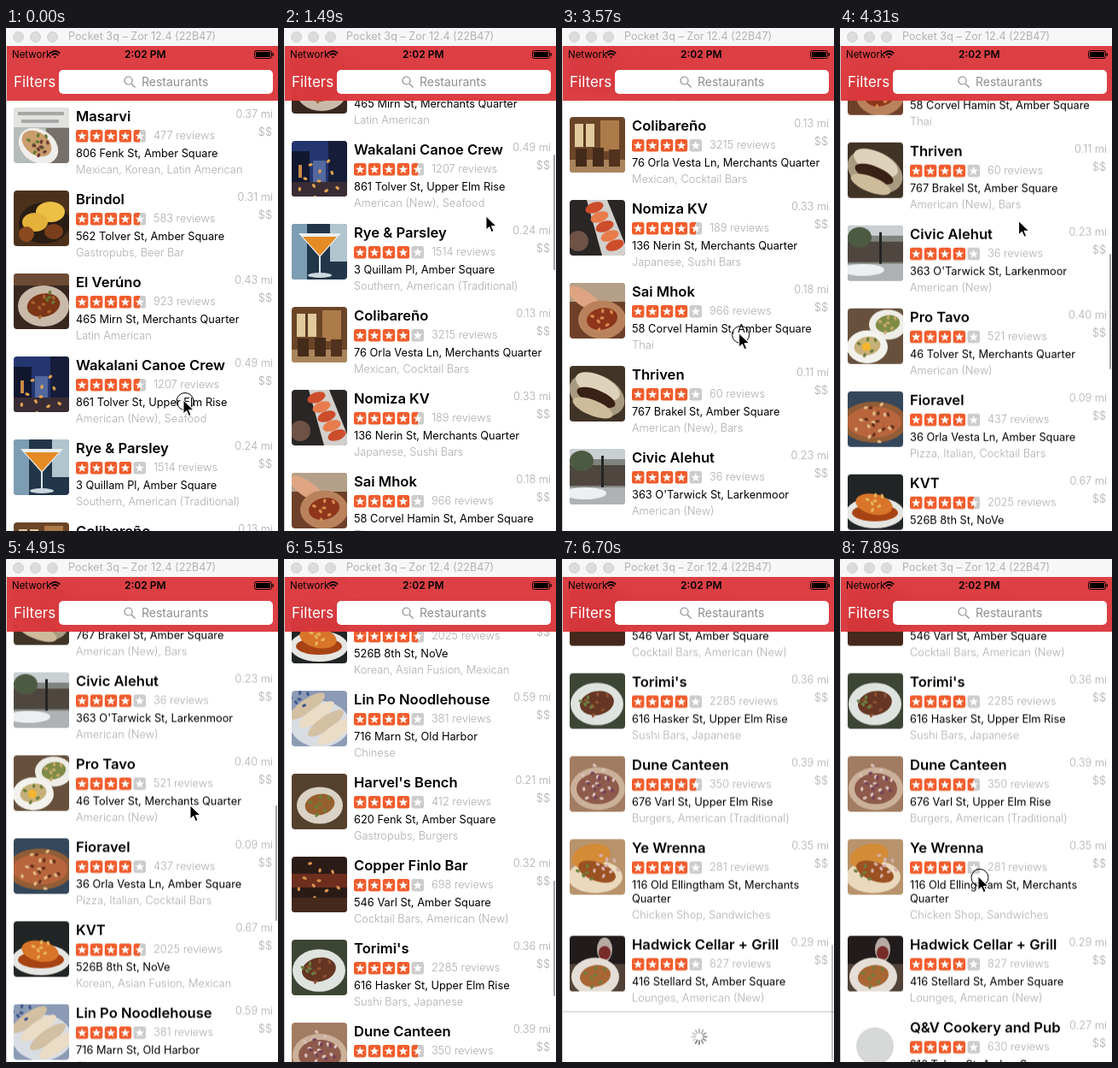
Write an HTML page that moves like this. It is 319x588 px and loops after 8 s.

```html
<!DOCTYPE html>
<html lang="en">
<head>
<meta charset="utf-8">
<title>Restaurant list</title>
<style>
html, body { margin: 0; width: 100%; height: 100%; overflow: hidden; background: #fff; }
body { position: relative; font: 12.8px/16px Inter, "Open Sans", sans-serif; color: #000; }
body *, .row * { white-space: pre; }
#list, .row, .row > *, .bar, .bar > *, .window, .window > *, #thumbBar, #cursor, #spinner, #edge { position: absolute; }
#list { left: 0; top: 84px; width: 319px; will-change: transform; }
.row { left: 0; width: 319px; height: 97px; background: #fff; }
.row::after { content: ""; position: absolute; left: 1px; right: 0; bottom: -1px; height: 1px; background: #d6d5d9; }
.photo { left: 9px; top: 9px; width: 65px; height: 65px; border-radius: 4px; }
.name { left: 82px; top: 9px; font-size: 16.6px; font-weight: 600; line-height: 20px; }
.stars { left: 82px; top: 35px; }
.reviews { left: 173px; top: 34px; }
.address { left: 82px; top: 55px; line-height: 15.5px; }
.kinds { left: 82px; bottom: 7px; }
.distance { right: 6px; top: 9px; }
.price { right: 7px; top: 30px; }
.reviews, .kinds, .distance, .price { color: #adadad; font-weight: 300; }
.bar { left: 1px; top: 21px; width: 318px; height: 64px; background: #db373cf4; backdrop-filter: blur(14px); }
.network { left: 6px; top: 2px; font-size: 11.5px; }
.clock { left: 138px; top: 2px; font-size: 12px; font-weight: 600; }
.filters { left: 8px; top: 32px; font-size: 17px; line-height: 20px; color: #fff; }
.search { left: 61px; top: 28px; width: 251px; height: 28px; border-radius: 5px; background: #fff; }
.hint { left: 158px; top: 33px; font-size: 14px; line-height: 18px; color: #8e8e93; }
.window { left: 0; top: 0; width: 319px; height: 21px; background: #f7f7f7; color: #b2b2b2; }
.window b { top: 4px; width: 11px; height: 11px; border-radius: 50%; background: #dcdcdc; border: 1px solid #d0d0d0; }
.window span { left: 73px; top: 2px; font-size: 12.6px; }
#edge { left: 0; top: 21px; width: 1px; height: 567px; background: #c9c9c9; }
#thumbBar { left: 315.5px; width: 2.5px; border-radius: 2px; background: #0000005c; }
#spinner { left: 150.5px; }
#cursor { left: 0; top: 0; overflow: visible; }
</style>
</head>
<body>
<div id="list"></div>
<div class="bar">
  <span class="network">Network</span>
  <svg style="left:50px;top:4px" width="13" height="12" fill="none" stroke="#000" stroke-width="1.7">
    <path d="M.8 4.6Q6.5-.8 12.2 4.6M2.8 6.8Q6.5 3.2 10.2 6.8"/><path d="M4.6 8.4h3.8L6.5 10.6Z" fill="#000" stroke="none"/>
  </svg>
  <span class="clock">2:02 PM</span>
  <svg style="left:290px;top:5px" width="24" height="10"><rect x=".5" y=".5" width="20" height="9" rx="2" fill="none" stroke="#000"/><path d="M2 2h17v6H2zM21.5 3.3h1.3v3.4h-1.3z"/></svg>
  <span class="filters">Filters</span>
  <div class="search"></div>
  <svg style="left:137px;top:35px" width="15" height="15" fill="none" stroke="#8e8e93" stroke-width="1.2"><circle cx="5.5" cy="5.5" r="4.5"/><path d="M9 9l4.5 4.5"/></svg>
  <span class="hint">Restaurants</span>
</div>
<div class="window">
  <b style="left:8px"></b><b style="left:28px"></b><b style="left:48px"></b>
  <span>Pocket 3q – Zor 12.4 (22B47)</span>
</div>
<div id="edge"></div>
<div id="thumbBar"></div>
<svg id="cursor" width="1" height="1">
  <circle id="press" cx="2" cy="1.5" r="10" fill="none" stroke="#000"/>
  <path d="M0 0V16l3.8-3.4 2.6 6 2.6-1.1-2.6-5.9H12Z" stroke="#fff"/>
</svg>
<svg width="0" height="0"><linearGradient id="half"><stop offset=".5" stop-color="#f15c2c"/><stop offset=".5" stop-color="#ccc"/></linearGradient></svg>
<script>
const $ = id => document.getElementById(id);
const range = n => [...Array(n).keys()];

// Photo shapes on a 65 x 65 square
const oval = (c, x, y, rx, ry = rx, turn = 0) =>
  `<ellipse cx="${x}" cy="${y}" rx="${rx}" ry="${ry}" fill="${c}" transform="rotate(${turn} ${x} ${y})"/>`;
const box = (c, x, y, w, h) => `<rect x="${x}" y="${y}" width="${w}" height="${h}" fill="${c}"/>`;
const shape = (c, d) => `<path d="${d}" fill="${c}"/>`;
const crumbs = (c, x, y, r, count = 7) => range(count).map(i =>
  oval(c, x + r * Math.cos(i * 2.4) * Math.sqrt(i / count), y + r * Math.sin(i * 2.4) * Math.sqrt(i / count), 2.6, 1.7, i * 50)).join("");
const dish = (x, y, r, plate, food, bits) =>
  oval(plate, x, y, r, r * .8) + oval(food, x, y - 1, r * .65, r * .45, -12) + crumbs(bits, x, y - 2, r * .55);

// name | stars | reviews | address | kinds | miles, then photo background and shapes
const rows = [
  ["Masarvi|4.5|477|806 Fenk St, Amber Square|Mexican, Korean, Latin American|0.37", "#b5bcb9",
    box("#e2e2df", 0, 0, 65, 23) + box("#a6a8a8", 5, 5, 54, 4) + box("#a6a8a8", 9, 14, 44, 4) + box("#77706a", 38, 24, 27, 41) + oval("#f0eeea", 29, 45, 25, 19, 35) + oval("#c99d6c", 27, 42, 19, 13, 35) + crumbs("#607a38", 28, 40, 14) + crumbs("#6d3b37", 32, 46, 11)],
  ["Brindol|4.5|583|562 Tolver St, Amber Square|Gastropubs, Beer Bar|0.31", "#4b311b",
    oval("#2a1d14", 36, 38, 30, 24) + oval("#ecbf45", 43, 25, 17, 12) + oval("#e4b13a", 25, 37, 15, 11) + oval("#8a4a1f", 15, 51, 9) + oval("#7a3e1c", 47, 48, 11, 9)],
  ["El Verúno|4.5|923|465 Mirn St, Merchants Quarter|Latin American|0.43", "#38271f",
    box("#6d4a33", 0, 0, 65, 14) + dish(35, 38, 30, "#c9b9a8", "#7b3517", "#a8612c") + crumbs("#67762f", 42, 28, 8, 4)],
  ["Wakalani Canoe Crew|4.5|1207|861 Tolver St, Upper Elm Rise|American (New), Seafood|0.49", "#24366f",
    box("#10172f", 0, 12, 21, 53) + box("#161d38", 43, 0, 22, 65) + box("#52689f", 25, 23, 15, 25) + box("#392c34", 0, 48, 65, 17) + crumbs("#e0a24d", 32, 47, 27, 11) + box("#c98948", 8, 28, 4, 15)],
  ["Rye & Parsley|4|1514|3 Quillam Pl, Amber Square|Southern, American (Traditional)|0.24", "#22364a",
    box("#7c9db2", 0, 0, 18, 65) + box("#b1c5cf", 45, 0, 20, 44) + shape("#e9eef0", "M8 11H58L33 39Z") + shape("#e58b25", "M13 15H53L33 37Z") + box("#dfe8ec", 32, 37, 2, 22) + oval("#cbd8df", 33, 60, 14, 3)],
  ["Colibareño|4|3215|76 Orla Vesta Ln, Merchants Quarter|Mexican, Cocktail Bars|0.13", "#6b4528",
    box("#e0c99d", 6, 8, 23, 27) + box("#5c3a21", 16, 8, 3, 27) + box("#ad7b49", 36, 4, 22, 36) + box("#a9845b", 0, 50, 65, 15) + box("#442a19", 7, 37, 13, 21) + box("#442a19", 27, 36, 13, 22) + box("#50321e", 46, 38, 13, 20)],
  ["Nomiza KV|4.5|189|136 Nerin St, Merchants Quarter|Japanese, Sushi Bars|0.33", "#292625",
    shape("#d2d0cd", "M20 0H44L65 52V65H38Z") + range(5).map(i => oval(i % 2 ? "#e87c4d" : "#cd4d2b", 29 + i * 6, 9 + i * 11, 11, 6, -20)).join("") + oval("#6d5245", 10, 48, 12)],
  ["Sai Mhok|4|966|58 Corvel Hamin St, Amber Square|Thai|0.18", "#6e402a",
    box("#b4a089", 0, 0, 65, 22) + oval("#dfa582", 18, 19, 24, 9, 35) + dish(38, 43, 28, "#b9825c", "#8e351b", "#d58c4e")],
  ["Thriven|4|60|767 Brakel St, Amber Square|American (New), Bars|0.11", "#403427",
    oval("#a89a80", 32, 34, 34, 23, 25) + oval("#ded2bb", 33, 24, 28, 13, 25) + oval("#3a2115", 31, 37, 24, 9, 22) + oval("#cdbb9b", 27, 49, 25, 9, 22)],
  ["Civic Alehut|4|36|363 O'Tarwick St, Larkenmoor|American (New)|0.23", "#80837e",
    box("#c9cfd2", 0, 0, 65, 12) + box("#4f473f", 0, 19, 65, 24) + oval("#4d5a42", 14, 14, 14, 12) + box("#242424", 37, 8, 3, 45) + box("#aeb2b5", 0, 45, 65, 20) + oval("#edf0f2", 18, 52, 25, 7)],
  ["Pro Tavo|4|521|46 Tolver St, Merchants Quarter|American (New)|0.40", "#67513d",
    dish(47, 19, 22, "#eeece6", "#7e8b45", "#c4a768") + dish(23, 45, 24, "#f3f1ec", "#c6b079", "#6d7d37") + oval("#f5b62d", 22, 45, 5)],
  ["Fioravel|4|437|36 Orla Vesta Ln, Amber Square|Pizza, Italian, Cocktail Bars|0.09", "#35475a",
    oval("#925d36", 31, 36, 39, 24) + oval("#b8653d", 31, 36, 32, 18) + crumbs("#e0bb87", 30, 36, 25, 12) + crumbs("#64311f", 35, 35, 20, 9)],
  ["KVT|4.5|2025|526B 8th St, NoVe|Korean, Asian Fusion, Mexican|0.67", "#222525",
    oval("#e5e5e2", 32, 45, 34, 18) + oval("#a74313", 32, 45, 27, 10) + oval("#d87528", 31, 35, 22, 12, 12) + crumbs("#e8b45d", 32, 31, 12)],
  ["Lin Po Noodlehouse|4|381|716 Marn St, Old Harbor|Chinese|0.59", "#8c9bb5",
    oval("#d8dde3", 33, 39, 35, 27) + range(4).map(i => oval(i % 2 ? "#eadcc5" : "#d3c0a3", 18 + i * 11, 18 + i * 10, 25, 8, -35)).join("") + crumbs("#3f598e", 9, 10, 13, 6)],
  ["Harvel's Bench|4|412|620 Fenk St, Amber Square|Gastropubs, Burgers|0.21", "#55402d", dish(33, 37, 27, "#d9d2c5", "#96602e", "#66803b")],
  ["Copper Finlo Bar|4|698|546 Varl St, Amber Square|Cocktail Bars, American (New)|0.32", "#2b1b17",
    box("#6d2e1d", 0, 20, 65, 16) + crumbs("#d8924d", 32, 28, 27, 10) + box("#44291c", 0, 48, 65, 17)],
  ["Torimi's|4|2285|616 Hasker St, Upper Elm Rise|Sushi Bars, Japanese|0.36", "#3d4634",
    dish(32, 36, 31, "#dfe3df", "#653623", "#8f5031") + crumbs("#678143", 21, 34, 9, 5)],
  ["Dune Canteen|4.5|350|676 Varl St, Upper Elm Rise|Burgers, American (Traditional)|0.39", "#a17c62",
    oval("#cbb199", 33, 38, 32, 25) + oval("#8d5a4b", 33, 38, 25, 18) + crumbs("#d9bfb9", 32, 32, 22, 16) + crumbs("#75405b", 34, 34, 18, 9)],
  ["Ye Wrenna|4|281|116 Old Ellingtham St, Merchants\nQuarter|Chicken Shop, Sandwiches|0.35", "#b8936b",
    oval("#ead9bc", 30, 44, 32, 19) + oval("#d38b36", 25, 20, 23, 14, -15) + oval("#9b5121", 32, 38, 23, 11, 20) + crumbs("#d6b0af", 43, 31, 16, 10) + crumbs("#6d803c", 20, 39, 12, 5)],
  ["Hadwick Cellar + Grill|4|827|416 Stellard St, Amber Square|Lounges, American (New)|0.29", "#211c1b",
    box("#514338", 0, 33, 65, 32) + oval("#b7aaa3", 41, 16, 9, 14) + oval("#772c2a", 41, 20, 7, 8) + box("#cac0b8", 40, 29, 2, 14) + dish(30, 48, 28, "#e4ded6", "#a86635", "#6d7e3d")],
  ["Q&V Cookery and Pub|4|630|216 Tolver St, Amber Square|Asian Fusion, Bars|0.27", "#fff", oval("#d5d8d7", 32, 32, 22)],
];

const TALL = 15.5, ROW = 97, FIRST_PAGE = 20;
const pageEnd = FIRST_PAGE * ROW + TALL;

const starPath = range(10).map(i => {
  const r = i % 2 ? 2.3 : 5.6, a = Math.PI * (i / 5 - .5);
  return `${i ? "L" : "M"}${7.2 + r * Math.cos(a)} ${7.5 + r * Math.sin(a)}`;
}).join("") + "Z";
const stars = rating => `<svg class="stars" width="83" height="15">` + range(5).map(i => {
  const fill = rating - i >= 1 ? "#f15c2c" : rating > i ? "url(#half)" : "#ccc";
  return `<g transform="translate(${i * 16.9} 0)"><rect width="14.4" height="14.4" rx="2.5" fill="${fill}"/>${shape("#fff", starPath)}</g>`;
}).join("") + "</svg>";

let nextTop = 0;
const spinnerTop = pageEnd + 20;
$("list").innerHTML = rows.map(([text, color, art], i) => {
  const [name, rating, reviews, address, kinds, miles] = text.split("|");
  const height = ROW + (address.includes("\n") ? TALL : 0);
  const html = `<div class="row" ${i === FIRST_PAGE ? 'id="nextPage"' : ""} style="top:${nextTop}px;height:${height}px">
<svg class="photo" style="background:${color}">${art}</svg><span class="name">${name.replace("&", "&amp;")}</span>${stars(+rating)}
<span class="reviews">${reviews} reviews</span><span class="address">${address}</span><span class="kinds">${kinds}</span>
<span class="distance">${miles} mi</span><span class="price">$$</span></div>`;
  nextTop += height;
  return html;
}).join("") + `<svg id="spinner" style="top:${spinnerTop}px" width="20" height="20" stroke-width="1.8" stroke-linecap="round">` +
  range(12).map(i => `<path d="M10 5.2V1.2" transform="rotate(${i * 30} 10 10)" stroke="#777"/>`).join("") + "</svg>";
const petals = [...$("spinner").children];

const LOOP = 8000, STEP = 148.8;
const glide = u => 1 - Math.pow(.827, u);

function track(keys, n) {
  const i = keys.findIndex(k => k[0] > n);
  if (i < 0) return keys[keys.length - 1][1];
  if (!i) return keys[0][1];
  const [a, from] = keys[i - 1], [b, to, slows] = keys[i];
  const part = slows ? glide(n - a) / glide(b - a) : (n - a) / (b - a);
  return from + (to - from) * part;
}

const scrollKeys = [[6, 0], [7, 20], [9, 170], [10, 252], [20, 474, true], [24, 474], [25, 520], [27, 650], [34, 848.5, true],
  [35, 915], [36, 1060], [38, 1340], [40, 1510], [41, 1543], [44, 1511.5, true]];
const cursorX = [[6, 208], [7, 209], [10, 237], [14, 222], [18, 207], [28, 208], [33, 216], [36, 220], [46, 207], [47, 207], [49, 160], [52, 160], [53, 162]];
const cursorY = [[0, 435], [1, 436], [6, 436], [7, 415], [9, 265], [10, 220], [14, 325], [18, 357], [24, 357], [25, 300], [27, 205], [28, 210],
  [33, 288], [34, 300], [36, 160], [46, 220], [47, 220], [49, 398], [52, 398], [53, 371]];
const barFade = [[6, 0], [7, 1], [18, 1], [21, 0], [24, 0], [25, 1], [44, 1], [47, 0]];
const within = (n, a, b) => n >= a && n <= b;

function draw(t) {
  const n = Math.floor((t + 6) / STEP);
  const scroll = track(scrollKeys, n);
  $("list").style.transform = `translateY(${-scroll}px)`;

  const loaded = n >= 46;
  $("nextPage").style.display = loaded ? "" : "none";
  $("spinner").style.display = loaded ? "none" : "";
  petals.forEach((p, i) => p.setAttribute("opacity", .3 + .7 * (((i - Math.floor(n * STEP * .012)) % 12 + 12) % 12) / 11));

  const over = Math.max(0, scroll - 1511.5);
  const bar = $("thumbBar").style;
  bar.top = 87 + .241 * (scroll - over) + over + "px";
  bar.height = 135 - over + "px";
  bar.opacity = track(barFade, n);

  $("cursor").style.display = within(n, 37, 45) ? "none" : "";
  $("cursor").style.transform = `translate(${track(cursorX, n)}px, ${track(cursorY, n)}px)`;
  const pressed = n === 0 || within(n, 7, 9) || within(n, 24, 26) || within(n, 34, 36) || n >= 53;
  $("press").style.display = pressed ? "" : "none";
}

const start = performance.now();
(function tick() {
  draw((performance.now() - start) % LOOP);
  requestAnimationFrame(tick);
})();
</script>
</body>
</html>
```
